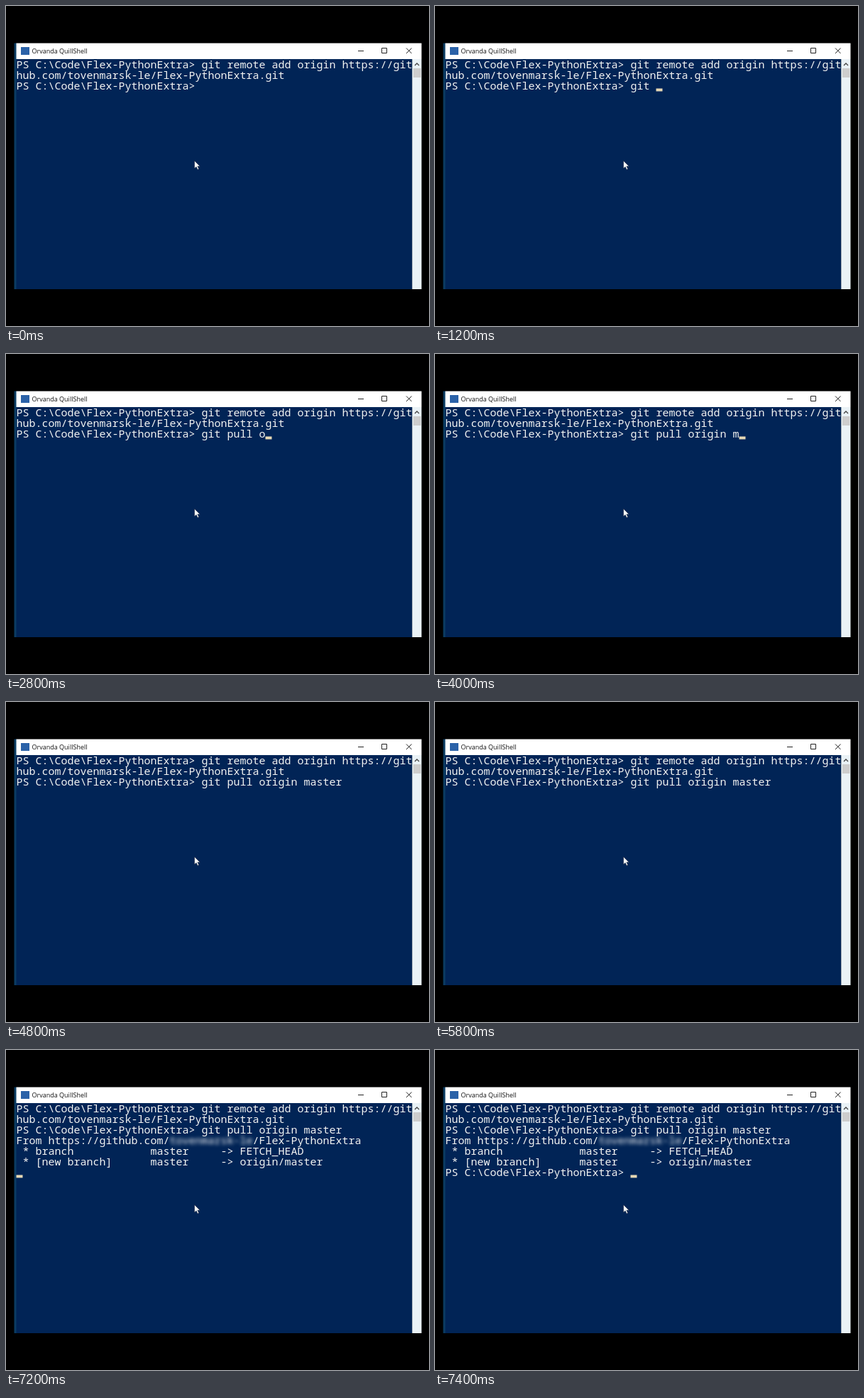
Write an HTML page that moves like this. It is 596 by 452 pixels and loops after 7800 ms.

```html
<!DOCTYPE html>
<html lang="en">
<head>
<meta charset="utf-8">
<title>Terminal</title>
<style>
  html, body { margin: 0; width: 100%; height: 100%; overflow: hidden; background: #000; }
  svg { display: block; }
  .term text { font: 500 15px "Noto Sans Mono", monospace; fill: #f4f3f2; white-space: pre; }
  .title { font: 9px "Open Sans", sans-serif; fill: #111; }
  .buttons { fill: none; stroke: #222; }
  .masked { filter: blur(2.8px); }
</style>
</head>
<body>
<svg width="596" height="452" viewBox="0 0 596 452">
  <rect width="596" height="452" fill="#000"/>
  <rect x="11.5" y="52.5" width="3.5" height="347.5" fill="#0b3c62"/>
  <rect x="14.5" y="75" width="558" height="325" fill="#012456"/>
  <rect x="14.5" y="52.5" width="571" height="22.5" fill="#fff"/>
  <rect x="21" y="58" width="12" height="11" fill="#2b62a8"/>
  <text class="title" x="36.5" y="67">Orvanda QuillShell</text>
  <path class="buttons" d="M496 63.5h8M529.5 59.5h7v7h-7zM564 59.5l7.5 7.5M571.5 59.5l-7.5 7.5"/>

  <rect x="572.3" y="75" width="13.2" height="325" fill="#eaf2f6"/>
  <path d="M576 84l3-3 3 3" fill="none" stroke="#444" stroke-width="1.3"/>
  <rect x="574" y="88" width="10.5" height="13" fill="#cdcdcd"/>

  <g class="term">
    <text x="14.5" y="88">PS C:\Code\Flex-PythonExtra&gt; git remote add origin https://git</text>
    <text x="14.5" y="103">hub.com/tovenmarsk-le/Flex-PythonExtra.git</text>
    <text x="14.5" y="118">PS C:\Code\Flex-PythonExtra&gt; <tspan id="cmd"></tspan></text>
    <g id="output" visibility="hidden">
      <text x="14.5" y="133">From https://github.com/</text>
      <text class="masked" x="230.5" y="133">tovenmarsk-le</text>
      <text x="347.5" y="133">/Flex-PythonExtra</text>
      <text x="14.5" y="148"> * branch            master     -&gt; FETCH_HEAD</text>
      <text x="14.5" y="163"> * [new branch]      master     -&gt; origin/master</text>
    </g>
    <text id="prompt" x="14.5" y="178" visibility="hidden">PS C:\Code\Flex-PythonExtra&gt; </text>
    <rect id="caret" width="9" height="4" fill="#e6d8b4"/>
  </g>

  <path d="M265.5 218.5v11l2.6-2.3 1.9 4 1.9-.9-1.9-3.9h3.4z"
        fill="#f4f4f4" stroke="#0a1a38" stroke-width=".6"/>
</svg>
<script>
  const LOOP = 7800, TICK = 200, COLUMN = 9, ROW = 15, PROMPT = 29;
  const ENTER = 6200, OUTPUT = 7200, DONE = 7400;
  const BLINK = 1000, LIT = 400;
  const COMMAND = "git pull origin master";

  // Typing pace: [time, characters], steady between neighbours
  const pace = [[400, 0], [1200, 4], [1600, 4], [1800, 5], [2000, 5], [4000, 17], [4400, 18], [4800, 22]];
  // Times from which the idle caret counts its blinks
  const blinkStarts = [-400, 1200, 1800, 4400];

  const [cmd, output, prompt, caret] =
    ["cmd", "output", "prompt", "caret"].map(id => document.getElementById(id));
  const show = (el, on) => el.setAttribute("visibility", on ? "visible" : "hidden");

  function typedAt(t) {
    const i = pace.findIndex(([time]) => time > t);
    if (i === 0) return 0;
    if (i < 0) return COMMAND.length;
    const [t0, n0] = pace[i - 1], [t1, n1] = pace[i];
    return Math.floor(n0 + (n1 - n0) * (t - t0) / (t1 - t0) + 0.45);
  }

  function caretAt(t, typed) {
    if (t >= DONE) return { col: PROMPT, row: 4, since: DONE };
    if (t >= ENTER) return { col: 0, row: t >= OUTPUT ? 4 : 1, since: ENTER - TICK };
    return { col: PROMPT + typed, row: 0, since: blinkStarts.findLast(s => s <= t) };
  }

  function draw(now) {
    const t = Math.floor(now % LOOP / TICK) * TICK;
    const typed = typedAt(t);
    const typing = typed < COMMAND.length && typed !== typedAt(t - TICK);
    const { col, row, since } = caretAt(t, typed);
    cmd.textContent = COMMAND.slice(0, typed);
    caret.setAttribute("x", 14.5 + col * COLUMN);
    caret.setAttribute("y", 116.5 + row * ROW);
    show(caret, typing || (t - since) % BLINK < LIT);
    show(output, t >= OUTPUT);
    show(prompt, t >= DONE);
  }

  const start = performance.now();
  function frame() {
    draw(performance.now() - start);
    requestAnimationFrame(frame);
  }
  frame();
</script>
</body>
</html>
```
